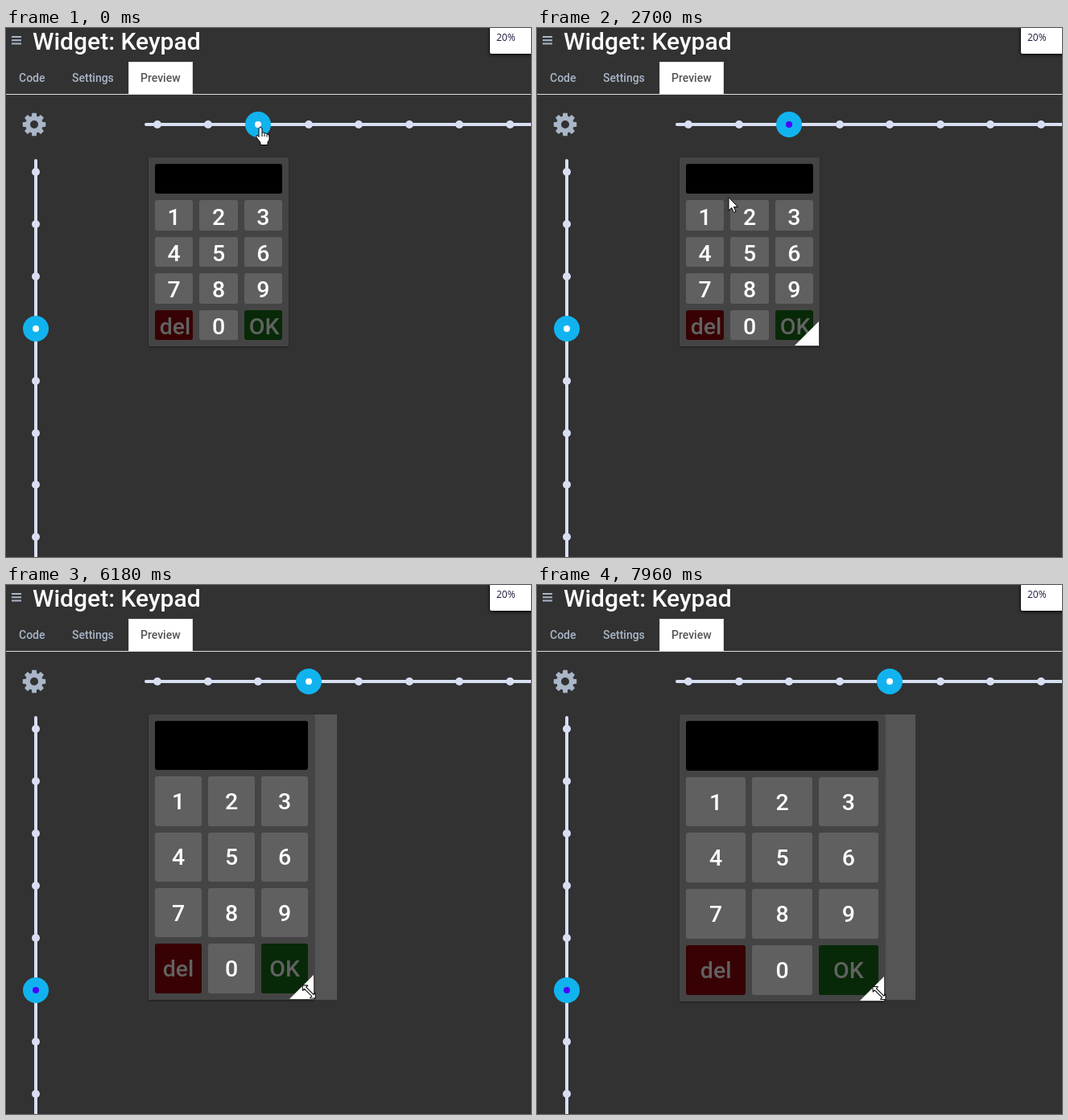
Recreate the animation shown at these times as an HTML page. Size 652 by 658 pixels, loop 8000 ms.

```html
<!DOCTYPE html>
<html lang="en">
<head>
<meta charset="utf-8">
<title>Widget: Keypad</title>
<style>
  html, body { margin: 0; width: 100%; height: 100%; overflow: hidden; background: #323232; }
  svg { display: block; font-family: Roboto, sans-serif; font-weight: 500; }
  .tab { font-size: 14px; fill: #a9b6c8; }
  .key { font-size: 28.5px; text-anchor: middle; fill: #fff; }
  .cur { fill: #fff; stroke: #000; stroke-width: 1; stroke-linejoin: round; }
  #panel { filter: drop-shadow(0 1px 1px rgba(0, 0, 0, .45)); }
</style>
</head>
<body>
<svg width="652" height="658" viewBox="0 0 652 658">
  <path d="M7 11h12M7 15.3h12M7 19.6h12" stroke="#a9b6c8" stroke-width="2"/>
  <text x="33" y="27" font-size="30" fill="#fff">Widget: Keypad</text>
  <rect y="82" width="652" height="1" fill="#ddd"/>
  <rect x="152.5" y="42.5" width="79" height="40" fill="#fff" stroke="#ddd"/>
  <text class="tab" x="16" y="67">Code</text>
  <text class="tab" x="82" y="67">Settings</text>
  <text class="tab" x="167" y="67" style="fill:#555">Preview</text>
  <rect x="601" y="-4" width="60" height="36" rx="2" fill="#fff" style="filter:drop-shadow(0 1px 2px #000)"/>
  <text x="609" y="16" font-size="12" font-weight="400" fill="#1c1c3c" font-family="Open Sans, sans-serif">20%</text>
  <path id="gear" fill="#a9b6c8" fill-rule="evenodd"/>
  <path d="M174 120H660M37 165V670" stroke="#d9dff3" stroke-width="4" stroke-linecap="round"/>
  <g id="dots" fill="#d9dff3"></g>
  <g id="hKnob"><circle r="16" fill="#11b3ef"/><circle r="4"/></g>
  <g id="vKnob"><circle r="16" fill="#11b3ef"/><circle r="4"/></g>
  <rect id="ghost" x="177" y="161" height="355" fill="#555"/>
  <rect id="panel" x="177" y="161" rx="1" fill="#444"/>
  <g id="keys"></g>
  <path id="corner" d="M0 0V-30L-30 0Z" fill="#fff"/>
  <g id="cursor" class="cur">
    <path id="hand" d="M-2 2Q0-2 2 2V7.5Q4 6 5 8Q7 7 8 9Q11 8.5 11 12V16L9 19V22.5H0V19.5L-5 13Q-6 10-3.5 10.5L-2 12.5ZM2 7.5V12M5 8.5V12M8 9.5V12.5"/>
    <path id="arrow" d="M0 .5V17L3.7 13.6L6.4 19.5L9 18.4L6.4 12.6H11.5Z"/>
    <path id="size" d="M0-11.5L4.5-6.5H1.5V6.5H4.5L0 11.5L-4.5 6.5H-1.5V-6.5H-4.5Z"/>
  </g>
</svg>
<script>
const LOOP = 8000, TICK = 137.5, LEFT = 177, TOP = 161, GAP = 8, CELL = 59.7;
const $ = id => document.getElementById(id);

function set(el, attrs) {
  for (const k in attrs) el.setAttribute(k, attrs[k]);
}
function add(parent, tag, attrs) {
  const el = document.createElementNS('http://www.w3.org/2000/svg', tag);
  set(el, attrs);
  return parent.appendChild(el);
}
const show = (el, on) => { el.style.display = on ? '' : 'none'; };
const move = (el, x, y, turn = 0) => set(el, { transform: `translate(${x} ${y}) rotate(${turn})` });

const ramp = (t, a, b) => Math.min(1, Math.max(0, (t - a) / (b - a)));
const ease = (t, a, b) => { const u = ramp(t, a, b); return u * u * (3 - 2 * u); };

// The screen refreshes in bursts: start time, number of ticks
const bursts = [[0, 1], [280, 8], [1862, 18], [4890, 7], [6020, 7], [7160, 3], [7680, 3]];
function lastTick(time) {
  const [start, count] = bursts.filter(b => b[0] <= time).pop();
  return start + TICK * Math.min(count - 1, Math.floor((time - start) / TICK));
}

// Slider travel, in stops from the starting one
const slideH = t => 2 * (ease(t, 420, 1000) - ease(t, 1725, 2275));
const slideV = t => 2 * ease(t, 3200, 3750);

const width = t => 174 + 119 * (ease(t, 560, 1260) - ease(t, 1740, 2472))
  + 132 * ease(t, 5900, 6700) + 44 * ease(t, 6720, 7435) - 95 * ease(t, 7500, 7955);
const height = t => 235 + 120 * ease(t, 3250, 4120) - ease(t, 6020, 6600) + 2.5 * ease(t, 7600, 7955);

// Pointer waypoints: time, x, y
const path = [[2280, 316, 123], [2687, 238, 210], [2824, 113, 290], [3110, 37, 376], [3240, 37, 378],
  [3924, 15, 520], [4890, 15, 524], [5440, 357, 507], [5710, 345, 508]];
function pointer(t) {
  let [, x, y] = path[0];
  for (let i = 1; i < path.length; i++) {
    const u = ramp(t, path[i - 1][0], path[i][0]);
    x += (path[i][1] - path[i - 1][1]) * u;
    y += (path[i][2] - path[i - 1][2]) * u;
  }
  return [x + 62.5 * slideH(t), y];
}

const hPos = i => Math.round(188 + 62.5 * i);
const vPos = i => Math.round(179 + 64.9 * i);
for (let i = 0; i < 8; i++) {
  add($('dots'), 'circle', { cx: hPos(i), cy: 120, r: 5 });
  add($('dots'), 'circle', { cx: 37, cy: vPos(i), r: 5 });
}

const teeth = [];
for (let i = 0; i < 32; i++) {
  const outer = i % 4 === 1 || i % 4 === 2;
  const a = (Math.floor(i / 4) + (i % 4 < 2 ? -1 : 1) * (outer ? .24 : .38)) * Math.PI / 4;
  const r = outer ? 14.5 : 10.8;
  teeth.push(`${35 + r * Math.cos(a)} ${120 + r * Math.sin(a)}`);
}
set($('gear'), { d: `M${teeth.join('L')}ZM40 120a5 5 0 1 0-10 0a5 5 0 1 0 10 0Z` });

// Rectangle with edges on whole pixels
function place(el, x, y, w, h) {
  const l = Math.round(x), t = Math.round(y);
  set(el, { x: l, y: t, width: Math.round(x + w) - l, height: Math.round(y + h) - t });
}

const display = add($('keys'), 'rect', { rx: 3, fill: '#000' });
const special = { del: '#380204', OK: '#082908' };
const keys = [...'123456789', 'del', '0', 'OK'].map(name => {
  const box = add($('keys'), 'rect', { rx: 3, fill: special[name] || '#606060' });
  const label = add($('keys'), 'text', { class: 'key' });
  label.textContent = name;
  if (special[name]) label.style.fill = '#626262';
  return { box, label, min: special[name] ? 25 : 0 };
});

function layout(w, h) {
  const kw = (w - 4 * GAP) / 3, kh = (h - 6 * GAP) / 5;
  place($('panel'), LEFT, TOP, w, h);
  place(display, LEFT + GAP, TOP + GAP, w - 2 * GAP, kh);
  keys.forEach(({ box, label, min }, i) => {
    const x = LEFT + GAP + (i % 3) * (kw + GAP);
    const y = TOP + GAP + (Math.floor(i / 3) + 1) * (kh + GAP);
    place(box, x, y, kw, kh);
    // Labels too large for their key overflow right and down
    set(label, { x: x + Math.max(kw / 2, min), y: Math.round(y + Math.max(kh / 2, 20.2) + 10) });
  });
  move($('corner'), LEFT + Math.round(w) - 1, TOP + Math.round(h) - 1);
}

function render(time) {
  const t = lastTick(time), w = width(t), h = height(t);
  const gripping = t > 5700, resizing = t >= 6020;
  const snapped = Math.ceil((w - 174) / CELL);
  layout(w, h);
  show($('ghost'), resizing);
  set($('ghost'), { width: Math.round(174 + CELL * snapped) });

  move($('hKnob'), hPos(2 + (resizing ? snapped : Math.round(slideH(t)))), 120);
  move($('vKnob'), 37, vPos(3 + Math.round(slideV(t))));
  set($('hKnob').lastChild, { fill: t >= 420 && t < 3230 ? '#4a00ff' : '#fff' });
  set($('vKnob').lastChild, { fill: t >= 3230 ? '#4a00ff' : '#fff' });

  const onEdge = t > 6400 && t < 6840;
  const [x, y] = gripping ? [LEFT + w + (onEdge ? 1 : -7), TOP + h - 10] : pointer(t);
  const hand = t < 2400 || (t > 3100 && t < 3800);
  show($('hand'), hand);
  show($('arrow'), !hand && !gripping);
  show($('size'), gripping);
  move($('cursor'), x, y, gripping && !onEdge ? -45 : 0);
  show($('corner'), gripping || (x > LEFT && x < LEFT + w && y > TOP && y < TOP + h));
}

function frame() {
  render(performance.now() % LOOP);
  requestAnimationFrame(frame);
}
frame();
</script>
</body>
</html>
```
